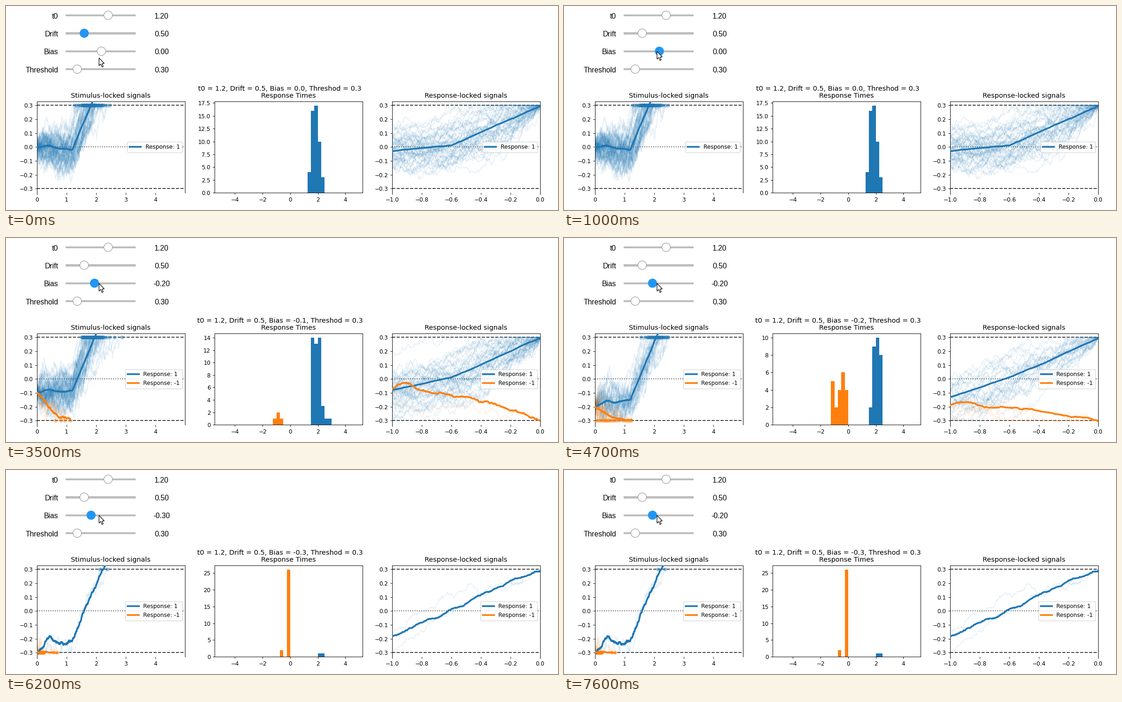
Animation of 1175x436 px, one loop 8 s. Source, as a matplotlib script:

```python
import numpy as np
import matplotlib.pyplot as plt
from matplotlib.animation import FuncAnimation
from matplotlib.collections import LineCollection
from matplotlib.patches import Circle, Polygon, Rectangle

W, H, DPI = 1175, 436, 64
PX = 72 / DPI          # points per pixel
PT = 1.2 * PX          # plots are shown at 1.2 times their 72 dpi size
BLUE, ORANGE, ACTIVE = "#1f77b4", "#ff7f0e", "#2196f3"
T0, DRIFT, LIMIT = 1.2, 0.5, 0.3
DT, BIN = 0.004, 0.25
BINS = np.arange(-5, 5, BIN)

plt.rcParams.update({
    "font.family": "DejaVu Sans",
    "font.size": 10 * PT,
    "axes.titlesize": 12 * PT,
    "axes.titlepad": 6 * PT,
    "axes.linewidth": 0.8 * PT,
    "legend.fontsize": 10 * PT,
    "patch.linewidth": 1.0 * PT,
    **{f"{a}tick.major.{k}": v * PT for a in "xy"
       for k, v in (("size", 3.5), ("pad", 3.5), ("width", 0.8))},
})

fig = plt.figure(figsize=(W / DPI, H / DPI), dpi=DPI, facecolor="white")


def leaky_noise(rng, n, std, leak):
    """Random walk from zero that is pulled back towards zero."""
    grow = np.exp(leak * DT * np.arange(n))
    steps = rng.normal(0, std * np.sqrt(2 * leak * DT), n)
    steps[0] = 0
    return np.cumsum(grow * steps) / grow


def reaction_times(start, counts):
    """Spread each bin's count evenly over the bin."""
    return np.concatenate([start + BIN * (k + (np.arange(n) + 0.5) / max(n, 1))
                           for k, n in enumerate(counts)])


def bump(x, center, width, height):
    return height * np.exp(-((x - center) / width) ** 2)


def stimulus_mean(t, bias, sign, n):
    if sign < 0:
        return -LIMIT + (bias + LIMIT) * np.exp(-(t / 0.5) ** 1.5)
    before = bias + (0.65 * bias - 0.018 - bias) * np.minimum(t / T0, 1)
    return (before + 1.02 * DRIFT * np.maximum(t - T0, 0)
            + bump(t, 0.4, 0.2, 0.12 / np.sqrt(n)))


def response_mean(x, bias, sign, n):
    if sign < 0:
        return (bias - (bias + LIMIT) * (1 + x) ** 2.5
                + bump(x, -0.9, 0.1, 0.07 / np.sqrt(n)))
    return np.interp(x, [-1, -0.6, 0], [0.5 * bias - 0.03, 0.01, 0.295])


def trial(rng, rt, bias, sign, n):
    """One noisy path that arrives at its threshold at time rt."""
    t = np.arange(0, rt + DT, DT)
    y = stimulus_mean(t, bias, sign, n)
    y += leaky_noise(rng, len(t), 0.08 * np.sqrt(1 - 1 / n), 2.5)
    y += (sign * LIMIT - y[-1]) * (t / t[-1]) ** 3
    return t, np.clip(y, -LIMIT, LIMIT)


def add_axes(col, title):
    left, top, width, height = 65.6 + 378.1 * col, 203.6, 315.1, 195.7
    ax = fig.add_axes([left / W, 1 - (top + height) / H, width / W, height / H])
    ax.set_title(title)
    return ax


def signal_axes(col, title, xlim, xticks):
    ax = add_axes(col, title)
    ax.set(xlim=xlim, ylim=(-0.33, 0.33), xticks=xticks, yticks=np.arange(-3, 4) / 10)
    ax.spines["bottom"].set_visible(False)
    for y in (-LIMIT, LIMIT):
        ax.axhline(y, color="#303030", ls="--", lw=1.5 * PT)
    ax.axhline(0, color="#505050", ls=":", lw=1.5 * PT)
    return ax


def draw_signals(ax, rng, paths, x, mean, color, label):
    ax.add_collection(LineCollection([np.column_stack(p) for p in paths],
                                     colors=color, alpha=0.1,
                                     linewidths=1.5 * PT, zorder=2))
    if paths:
        mean = mean + leaky_noise(rng, len(x), 0.012 / np.sqrt(len(paths)), 8)
    else:
        x = mean = []
    ax.plot(x, mean, color=color, lw=3 * PT, label=label, zorder=4)


def build_scene(bias, step, responses):
    """responses holds (sign, first bin, counts per bin)."""
    rng = np.random.default_rng(7)
    stim = signal_axes(0, "Stimulus-locked signals", (0, 4.998), range(5))
    hist = add_axes(1, "Response Times")
    resp = signal_axes(2, "Response-locked signals", (-1, 0), np.arange(-5, 1) / 5)

    for sign, start, counts in responses:
        color = BLUE if sign > 0 else ORANGE
        label = f"Response: {sign}"
        rts = reaction_times(start, counts)
        n = len(rts)
        paths = [trial(rng, rt, bias, sign, n) for rt in rts]
        late = [(t - t[-1], y) for t, y in paths if t[-1] >= 1]

        t = np.arange(0, rts.max(), DT)
        draw_signals(stim, rng, paths, t, stimulus_mean(t, bias, sign, n), color, label)
        x = np.arange(-1, DT / 2, DT)
        draw_signals(resp, rng, late, x,
                     response_mean(np.minimum(x, 0), bias, sign, max(len(late), 1)),
                     color, label)
        stim.plot(rts, np.full(n, sign * LIMIT), "o", color=color, alpha=0.4,
                  ms=6 * PT, zorder=3)
        hist.hist(sign * rts, BINS, color=color)

    top = 1.05 * max(max(counts) for _, _, counts in responses)
    hist.set(xlim=(-5.4875, 5.2375), ylim=(0, top),
             xticks=range(-4, 5, 2), yticks=np.arange(0, top, step))
    for ax in (stim, resp):
        ax.legend(loc="center right").set_zorder(6)
    title = f"t0 = {T0}, Drift = {DRIFT}, Bias = {bias}, Threshod = {LIMIT}"
    return title, (stim, hist, resp)


scenes = [
    build_scene(0.0, 2.5, [(1, 1.25, [4, 16, 17, 10, 3])]),
    build_scene(-0.1, 2, [(1, 1.5, [14, 13, 14, 3, 1, 1]), (-1, 0.5, [1, 2, 1])]),
    build_scene(-0.2, 2, [(1, 1.5, [2, 9, 10, 8]), (-1, 0, [4, 6, 4, 2, 5])]),
    build_scene(-0.3, 5, [(1, 2, [1, 1]), (-1, 0, [26, 0, 2])]),
]

# Controls, drawn in stage pixels with y pointing down
stage = fig.add_axes([0, 0, 1, 1], zorder=5)
stage.set(xlim=(0, W), ylim=(H, 0))
stage.axis("off")
heading = stage.text(583.2, 181, "", ha="center", size=12 * PT)


def paint(knob, active):
    knob.set_facecolor(ACTIVE if active else "white")
    knob.set_edgecolor(ACTIVE if active else "#9e9e9e")


def add_slider(row, name, x, value):
    y = 20 + 38.4 * row
    font = dict(family="Liberation Sans", size=15.6 * PX)
    stage.text(111, y + 6.6, name, ha="right", **font)
    stage.add_patch(Rectangle((127, y - 2.2), 149, 4.4, fc="#bdbdbd", lw=0))
    knob = stage.add_patch(Circle((x, y - 0.2), 9.1, lw=1.2 * PX, zorder=3))
    paint(knob, False)
    return knob, stage.text(331.3, y + 6.6, f"{value:.2f}", ha="center", **font)


add_slider(0, "t0", 217.5, T0)
drift_knob, _ = add_slider(1, "Drift", 166.5, DRIFT)
bias_knob, bias_text = add_slider(2, "Bias", 203, 0)
add_slider(3, "Threshold", 151.5, LIMIT)

ARROW = np.array([(0, 0), (0, 16.5), (3.8, 13), (6.4, 19.4), (9, 18.2),
                  (6.5, 12.2), (11.2, 11.8)])
cursor = stage.add_patch(Polygon(ARROW, fc="white", ec="black", lw=1.2 * PX, zorder=5))

# (start in tenths of a second, value)
BIAS = [(0, 0.0), (16, -0.1), (20, -0.2), (49, -0.3), (76, -0.2)]
SCENE = [(0, 0), (35, 1), (47, 2), (62, 3)]


def at(steps, frame):
    return [value for start, value in steps if start <= frame][-1]


def update(frame):
    current = at(SCENE, frame)
    for i, (_, axes) in enumerate(scenes):
        for ax in axes:
            ax.set_visible(i == current)
    heading.set_text(scenes[current][0])

    bias = at(BIAS, frame)
    bias_knob.set_center((203 + 73 * bias, bias_knob.center[1]))
    bias_text.set_text(f"{bias:.2f}")
    paint(bias_knob, frame >= 7)
    paint(drift_knob, frame < 10)
    moved = np.clip((frame - 5) / 3, 0, 1)
    cursor.set_xy(ARROW + (198, 111 - 14 * moved))
    return []


anim = FuncAnimation(fig, update, frames=80, interval=100, repeat=True,
                     repeat_delay=0, init_func=lambda: [])
plt.show()
```
